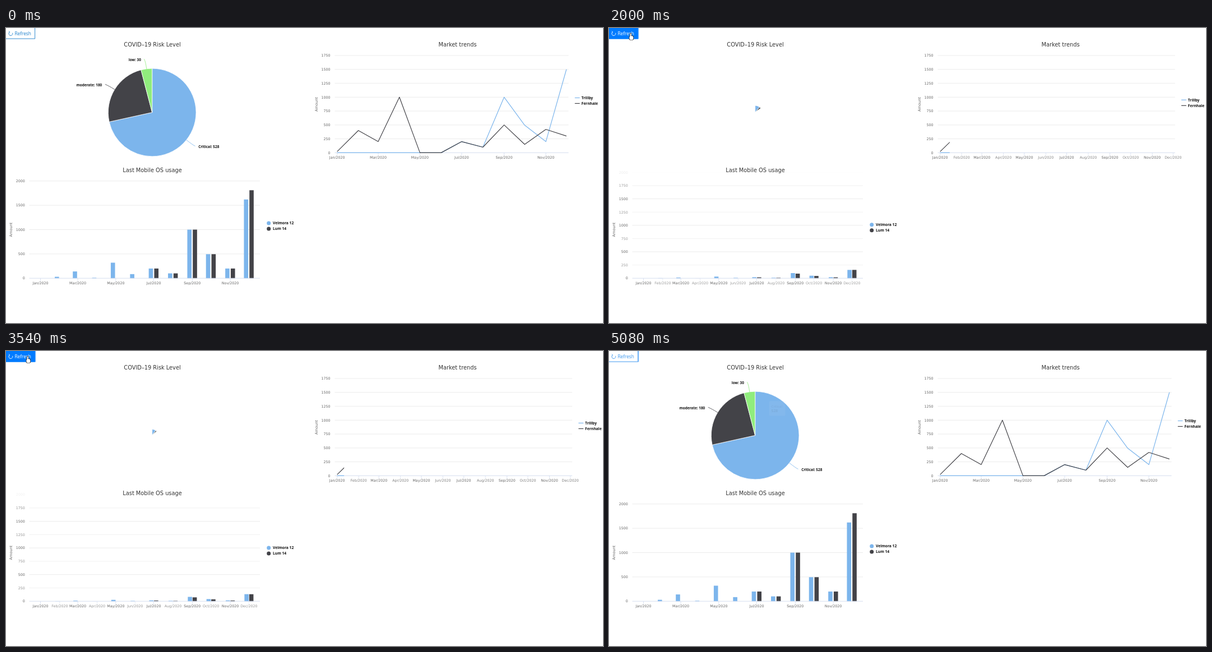
Recreate the animation shown at these times as an HTML page with a canvas. Size 1065x526 px, loop 5840 ms.

```html
<!DOCTYPE html>
<html lang="en">
<head>
<meta charset="utf-8">
<title>Dashboard</title>
<style>
  html, body { margin: 0; width: 100%; height: 100%; overflow: hidden; background: #fff; }
  canvas { display: block; }
</style>
</head>
<body>
<canvas id="stage" width="1065" height="526"></canvas>
<script>
const ctx = document.getElementById('stage').getContext('2d');
const LOOP = 5840, LAST_CHANGE = 5080;
const BLUE = '#7cb5ec', DARK = '#434348', GREEN = '#90ed7d';
const GRID = '#e6e6e6', AXIS = '#ccd6eb';
const SANS = '"DejaVu Sans", sans-serif', HUMAN = '"Noto Sans", sans-serif', UI = '"Open Sans", sans-serif';

const MONTHS = 'Jan Feb Mar Apr May Jun Jul Aug Sep Oct Nov Dec'.split(' ');
const dayOf = month => (Date.UTC(2020, month) - Date.UTC(2020, 0)) / 864e5;

const idle = Array(6).fill(0);
const autumn = [200, 100, 1000, 495, 200];
const TRENDS = [
  { name: 'Trillby', color: BLUE, data: [...idle, ...autumn, 1500] },
  { name: 'Fernhale', color: DARK, data: [20, 400, 200, 1000, 0, 0, 200, 100, 500, 150, 420, 300] }
];
const USAGE = [
  { name: 'Velmora 12', color: BLUE, data: [0, 30, 140, 10, 320, 85, ...autumn, 1620] },
  { name: 'Lum 14', color: DARK, data: [...idle, ...autumn, 1810] }
];

// Reloads: the charts vanish, then come back one after another
const RELOADS = [1740, 3297], BLANK = 87, STAGGER = 58;

const clamp = x => Math.max(0, Math.min(1, x));
const lerp = (a, b, p) => a + (b - a) * p;
const sine = x => (1 - Math.cos(Math.PI * clamp(x))) / 2;
const easeOut = x => 1 - (1 - clamp(x)) ** 2;
// 0 to 1 after `on`, back to 0 at `off`
const pulse = (t, on, off, ramp) => clamp(Math.min(t - on, off - t) / ramp);

function withAlpha(alpha, draw) {
  if (alpha <= 0) return;
  ctx.save();
  ctx.globalAlpha *= alpha;
  draw();
  ctx.restore();
}

// y is the middle of the capitals
function text(str, x, y, size, { color = '#666', align = 'left', font = SANS, weight = 400 } = {}) {
  ctx.font = `${weight} ${size}px ${font}`;
  ctx.fillStyle = color;
  ctx.textAlign = align;
  ctx.fillText(str, x, y + size * 0.36);
}

function stroke(color, width) {
  ctx.strokeStyle = color;
  ctx.lineWidth = width;
  ctx.stroke();
}

function line(points, color, width = 0.8) {
  ctx.beginPath();
  points.forEach(([x, y]) => ctx.lineTo(x, y));
  stroke(color, width);
}

const title = (str, x, y) => text(str, x, y, 9.8, { color: '#333', align: 'center' });
const bold = (str, x, y, size, align) => text(str, x, y, size, { color: '#111', align, font: HUMAN, weight: 700 });

function axisName(x, y) {
  ctx.save();
  ctx.translate(x, y);
  ctx.rotate(-Math.PI / 2);
  text('Amount', 0, 0, 6.6, { align: 'center' });
  ctx.restore();
}

// Every second month fades out as the layout settles
function monthAxis(left, right, y, xOf, settled) {
  line([[left, y], [right, y]], AXIS);
  MONTHS.forEach((month, i) => withAlpha(i % 2 ? 1 - settled : 1, () => {
    const x = xOf(i);
    line([[x, y], [x, y + 5]], AXIS, 0.7);
    text(month + '/2020', x, y + 8.6, 6.3, { align: 'center' });
  }));
}

function pieChart(age, t) {
  const cx = 260.7, cy = 150.5, radius = 78.4, reach = 96, total = 738;
  const grown = sine(age / 1000), labels = clamp((age - 1000) / 80);
  const slices = [
    { name: 'Critical', value: 528, color: BLUE, dimmed: pulse(t, 600, 1085, 100) },
    { name: 'moderate', value: 180, color: DARK, dimmed: pulse(t, 500, 600, 40) },
    { name: 'low', value: 30, color: GREEN, dimmed: pulse(t, 500, 1085, 100) }
  ];
  title('COVID–19 Risk Level', 261, 29.3);
  let from = -Math.PI / 2;
  for (const { name, value, color, dimmed } of slices) {
    const to = from + value / total * grown * 2 * Math.PI;
    withAlpha(1 - 0.75 * dimmed, () => {
      ctx.beginPath();
      ctx.moveTo(cx, cy);
      ctx.arc(cx, cy, radius * grown, from, to);
      ctx.closePath();
      ctx.fillStyle = color;
      ctx.fill();
      stroke('#fff', 0.8);
    });
    withAlpha(labels, () => {
      const middle = (from + to) / 2, side = Math.sign(Math.cos(middle));
      const at = r => [cx + r * Math.cos(middle), cy + r * Math.sin(middle)];
      const [x, y] = at(reach);
      ctx.beginPath();
      ctx.moveTo(...at(radius));
      ctx.quadraticCurveTo(...at(reach - 5), x + side * 2, y);
      stroke(color, 0.8);
      bold(`${name}: ${value}`, x + side * 7.6, y + 1, 6.4, side > 0 ? 'left' : 'right');
    });
    from = to;
  }
}

function columnChart(age) {
  const grown = sine(age / 1000), settled = sine(age / 500);
  const base = 446.2, left = 41.5, right = 453, width = 7.6;
  const unit = 173.4 / lerp(1750, 2000, settled);
  const xOf = i => 61.5 + dayOf(i) * 1.11;
  const yOf = v => base - v * unit;

  for (let v = 0; v <= 2000; v += 250) {
    const alpha = v === 2000 ? settled ** 2 : v % 500 ? 1 - settled : 1;
    withAlpha(alpha, () => {
      if (v) line([[left, yOf(v)], [right, yOf(v)]], GRID);
      text(String(v), 33.7, yOf(v), 6.3, { align: 'right' });
    });
  }
  title('Last Mobile OS usage', 261, 253);
  axisName(9, 359.5);

  USAGE.forEach(({ name, color, data }, s) => {
    const scale = s ? lerp(0.84, 1, settled) : 1;
    const shift = s ? 0.3 + settled * 0.6 : -width - settled * 1.3;
    ctx.fillStyle = color;
    data.forEach((v, i) => {
      const h = v * scale * unit * grown;
      ctx.fillRect(xOf(i) + shift, base - h, width, h);
    });
    const y = lerp(352.4, 348, settled) + s * 10;
    ctx.beginPath();
    ctx.arc(468.7, y, 3.5, 0, 2 * Math.PI);
    ctx.fill();
    bold(name, 476, y, 6.7);
  });
  monthAxis(left, right, base, xOf, settled);
}

function lineChart(age) {
  const grown = sine(age / 1000), settled = sine(age / 500);
  const base = 222.4, left = 586.5, right = lerp(1011.3, 1003.5, settled);
  const xOf = i => 590.7 + dayOf(i) * lerp(1.2455, 1.221, settled);
  const yOf = v => base - v * 0.0991;

  title('Market trends', 805.5, 29.3);
  axisName(553.5, 136);
  for (let v = 0; v <= 1750; v += 250) {
    if (v) line([[left, yOf(v)], [right, yOf(v)]], GRID);
    text(String(v), 578.5, yOf(v), 6.3, { align: 'right' });
  }
  monthAxis(left, right, base, xOf, settled);

  TRENDS.forEach(({ name, color, data }, s) => {
    ctx.save();
    ctx.beginPath();
    ctx.rect(left, 40, (right - left) * grown, 190);
    ctx.clip();
    ctx.lineJoin = 'round';
    line(data.map((v, i) => [xOf(i), yOf(v)]), color, 1.2);
    ctx.restore();

    const x = right + 11.2, y = lerp(129.2, 124.5, settled) + s * 10;
    line([[x, y], [x + 8.8, y]], color, 1.2);
    bold(name, x + 11.8, y, 6.7);
  });
}

function charts(t) {
  const opened = RELOADS.filter(r => t >= r - BLANK).pop() ?? -LOOP;
  [pieChart, columnChart, lineChart].forEach((draw, i) => {
    const age = t - opened - i * STAGGER;
    if (age >= 0) draw(age, t);
  });
}

function tooltip(name, value, x, y, width, color, alpha) {
  withAlpha(alpha, () => {
    ctx.beginPath();
    ctx.roundRect(x, y, width, 26, 1.5);
    ctx.fillStyle = 'rgba(247,247,247,.85)';
    ctx.fill();
    stroke(color, 0.8);
    text(name, x + 4, y + 9.5, 5.6, { color: '#333' });
    text(value, x + 4, y + 17.5, 6.8, { color: '#333', font: HUMAN, weight: 700 });
  });
}

function tooltips(t) {
  const critical = pulse(t, 510, 620, 50) + pulse(t, 4390, 5087, 90);
  tooltip('Critical', '528', 285.5, 89.5, 29, BLUE, critical);
  tooltip('moderate', '180', 221.5, 107.5, 35, DARK, pulse(t, 600, 1220, 100));
}

function button(t) {
  const filled = pulse(t, 1300, 4600, 240), w = 52, h = 19.5;
  const ink = t < RELOADS[0] ? '#1f80cc' : '#3a96ee';
  const color = filled > 0.5 ? '#fff' : ink;
  const box = (fill, width) => {
    ctx.fillStyle = fill;
    ctx.fillRect(0, 0, width, h);
  };
  if (t >= RELOADS[0] - BLANK) box('rgba(0,123,255,.45)', w + 1.4);
  box('#fff', w);
  line([[0, h - 0.4], [w - 0.4, h - 0.4], [w - 0.4, 0]], ink, 0.9);
  withAlpha(filled, () => box('#007bff', w));

  ctx.beginPath();
  ctx.arc(8.4, 10, 3.4, -0.35, Math.PI * 1.3);
  stroke(color, 0.9);
  line([[5.2, 5.6], [6.6, 7.2], [5, 8.6]], color, 0.9);
  text('Refresh', 15.4, 9.6, 8.3, { color, font: UI });
}

const ARROW = new Path2D('M0 0V9.3L2.1 7.4L3.7 11L5.2 10.3L3.7 6.9H6.5Z');
const HAND = new Path2D();
HAND.roundRect(0, 0, 2, 8, 1);
HAND.roundRect(-1.2, 4.8, 7, 6.6, 2);

function pointer(t) {
  const enter = 70, press = 1260, leave = 4166, gone = 5000;
  if (t < enter || t >= LAST_CHANGE) return;
  const restX = 37.6, restY = 9.5;
  let x = restX, y = restY, shape = HAND;
  if (t < press) {
    const p = easeOut((t - enter) / 1160);
    [x, y, shape] = [lerp(777, 41, p), lerp(446, 19, p), ARROW];
  } else if (t > leave) {
    const p = easeOut((t - leave) / (gone - leave));
    [x, y, shape] = [lerp(restX, 870, p), lerp(restY, 402, p ** 1.17), ARROW];
  }
  ctx.save();
  ctx.translate(x, y);
  ctx.strokeStyle = '#111';
  ctx.lineWidth = 1.4;
  ctx.stroke(shape);
  ctx.fillStyle = '#fff';
  ctx.fill(shape);
  ctx.restore();
}

function frame(time) {
  const t = Math.min(time % LOOP, LAST_CHANGE);
  ctx.fillStyle = '#fff';
  ctx.fillRect(0, 0, 1065, 526);
  charts(t);
  tooltips(t);
  button(t);
  pointer(t);
}

let start;
function tick(now) {
  start ??= now;
  frame(now - start);
  requestAnimationFrame(tick);
}
requestAnimationFrame(tick);
</script>
</body>
</html>
```
